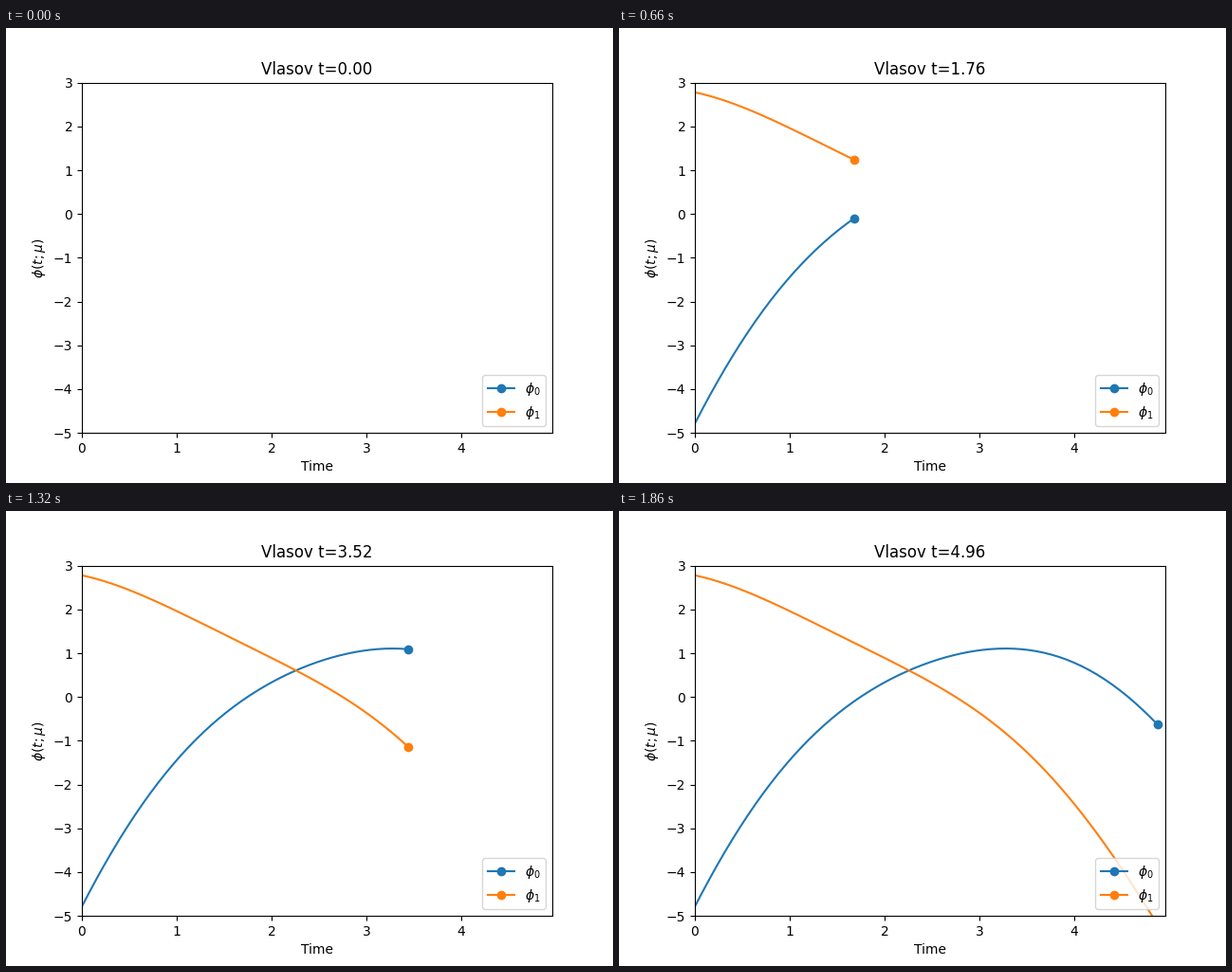
Recreate the animation shown at these times as a matplotlib script. Size 640 by 480 pixels, loop 1890 ms.

```python
import numpy as np
import matplotlib.pyplot as plt
from matplotlib.animation import FuncAnimation

FRAMES, INTERVAL, DT = 63, 30, 0.08


def phi_0(t):
    drift = -4.897 + 4.0455 * t - 0.707 * t**2 + 0.0107 * t**3
    return drift - 0.1565 * np.cos(1.6 * (t - 2.448))


def phi_1(t):
    drift = 2.594 - 0.1105 * t - 0.306 * t**2
    return drift - 0.312 * np.cos(1.4 * (t - 1.574))


time = DT * np.arange(FRAMES)
curves = [phi_0(time), phi_1(time)]

fig, ax = plt.subplots(figsize=(6.4, 4.8), dpi=100)
lines = [ax.plot(time, values, "-o", markevery=[-1], label=rf"$\phi_{i}$")[0]
         for i, values in enumerate(curves)]
ax.set(xlim=(0, time[-1]), ylim=(-5, 3), xlabel="Time", ylabel=r"$\phi(t;\mu)$")
ax.legend(loc="lower right")
title = ax.set_title("Vlasov t=0.00")


def update(n):
    """Show the first n samples, with a marker on the newest one."""
    title.set_text(f"Vlasov t={time[n]:.2f}")
    for line, values in zip(lines, curves):
        line.set_visible(n > 0)
        if n:
            line.set_data(time[:n], values[:n])
    return [title, *lines]


anim = FuncAnimation(fig, update, frames=FRAMES, interval=INTERVAL,
                     repeat=True, repeat_delay=0, blit=False)
plt.show()
```
